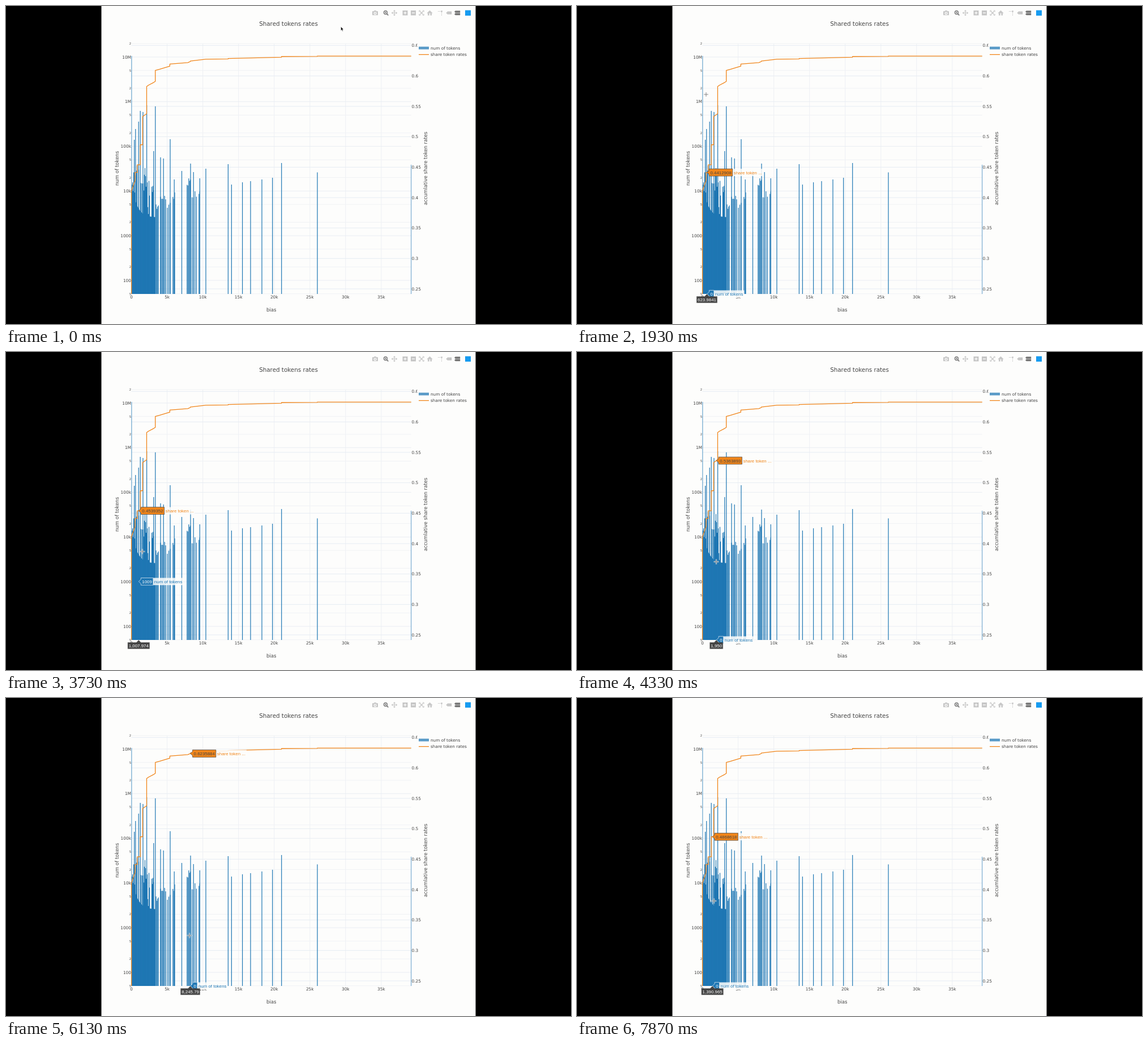
Recreate the animation shown at these times as an HTML page with a canvas. Size 998 px wide and 561 px high, loop 8000 ms.

```html
<!DOCTYPE html>
<html lang="en">
<head>
<meta charset="utf-8">
<title>Shared tokens rates</title>
<style>
  html, body { margin: 0; width: 100%; height: 100%; overflow: hidden; background: #000; }
  canvas { display: block; }
</style>
</head>
<body>
<canvas id="stage" width="998" height="561"></canvas>
<script>
const ctx = document.getElementById('stage').getContext('2d');
const PAPER = '#fdfdfc', BLUE = '#1f77b4', ORANGE = '#f0851a', INK = '#444';
const LEFT = 221.6, RIGHT = 715.7, TOP = 66, BOTTOM = 508;
const SANS = '"DejaVu Sans", sans-serif', LABEL_FONT = '"Liberation Sans", Arial, sans-serif';
const LOOP = 8000, TICKS = 120;

const xOf = k => LEFT + k * 12.606;                       // bias, thousands
const yLog = v => 90 + 78.8 * (7 - Math.log10(v));        // token count
const yRate = r => 123.3 + (0.6 - r) * 1073.5;            // accumulated rate
const noise = i => Math.abs(Math.sin(i * 12.9898) * 43758.5453) % 1;

// Jumps of the rate: [bias in thousands, rate before, rate after]
const curve = [
  [0, .2416, .4112], [.5, .428, .4412908], [.82, .4412908, .4539352],
  [1.24, .4539352, .4868618], [1.57, .4868618, .5332], [2.13, .5379, .5826],
  [2.41, .5849], [3.116921, .5892678], [3.34, .591, .6091], [3.9319, .6108736],
  [5.38, .6161, .6194], [7.9, .6218], [8.24579, .6235884, .6243], [10.4, .6275],
  [13.55, .6279, .6285], [21.02, .6307, .6317], [26.03, .632, .6325], [39.2, .6325]
].flatMap(([k, before, after = before]) => [[k, before], [k, after]]);

// Tall bars: [x, top]
const peaks = [
  [226.6, 236], [228.8, 217], [234.2, 204], [237.2, 185], [242, 187], [248.6, 175],
  [260.8, 256], [263.8, 177], [273, 267], [278.2, 269], [290, 235], [297.2, 306], [310.5, 291],
  [326, 278], [331.2, 293], [342.3, 304], [353, 287], [392.4, 279], [398.4, 315], [417.6, 311],
  [432, 309], [452, 306], [470.7, 303], [486.7, 277], [550, 293.5]
];

// Groups of short bars: [first x, count, spacing, typical top]
const clusters = [
  [265, 4, 1.4, 350], [273, 6, 1.8, 340], [285, 3, 2.5, 350],
  [294.8, 3, 1.6, 335], [319.8, 5, 1.5, 312], [328.6, 4, 2.6, 331], [340.8, 2, 1.5, 329]
];

// Pointer glides: [first tick, last tick, x, y, hovered bias in thousands]
const glides = [
  [0, 0, 592, 40, 29], [1, 6, 575, 44, 27.7], [12, 18, 228, 78, 3.116921],
  [18, 26, 228, 156, .6239841], [30, 36, 230, 473, .6239841], [41, 47, 226, 430, .33],
  [48, 56, 241, 352, 1.007974], [57, 65, 246, 370, 1.95], [66, 76, 273, 413, 3.9319],
  [82, 92, 324, 419, 8.24579], [93, 98, 244, 385, 1.78], [99, 105, 231, 365, .72],
  [113, 118, 242, 358, 1.390965]
];

function rateAt(k) {
  const i = Math.max(1, curve.findIndex(point => point[0] >= k));
  const [k0, r0] = curve[i - 1], [k1, r1] = curve[i];
  return r0 + (r1 - r0) * (k - k0) / (k1 - k0 || 1);
}

function pointerAt(tick) {
  let state = glides[0].slice(2);
  for (const [from, to, ...goal] of glides.slice(1)) {
    const p = Math.min(1, Math.max(0, (tick - from) / (to - from)));
    const eased = p * p * (3 - 2 * p);
    state = state.map((v, i) => v * (1 - eased) + goal[i] * eased);
  }
  return state;
}

function line(points, color, width) {
  ctx.beginPath();
  points.forEach(([x, y]) => ctx.lineTo(x, y));
  ctx.strokeStyle = color;
  ctx.lineWidth = width;
  ctx.stroke();
}

function plus(x, y, r, color, width) {
  line([[x - r, y], [x + r, y]], color, width);
  line([[x, y - r], [x, y + r]], color, width);
}

function box(x, y, w, h, color) {
  ctx.fillStyle = color;
  ctx.fillRect(x, y, w, h);
}

function polygon(points, fill, stroke = fill, width = 0.4) {
  ctx.beginPath();
  points.forEach(([x, y]) => ctx.lineTo(x, y));
  ctx.closePath();
  ctx.fillStyle = fill;
  ctx.fill();
  ctx.strokeStyle = stroke;
  ctx.lineWidth = width;
  ctx.stroke();
}

function ring(x, y, r, color) {
  ctx.beginPath();
  ctx.arc(x, y, r, 0, 7);
  ctx.strokeStyle = color;
  ctx.lineWidth = 1.3;
  ctx.stroke();
}

function text(str, x, y, size, align = 'left', color = INK, family = SANS) {
  ctx.font = `${size}px ${family}`;
  ctx.textAlign = align;
  ctx.fillStyle = color;
  ctx.fillText(str, x, y + size * 0.36);
}

function upright(str, x, y) {
  ctx.save();
  ctx.translate(x, y);
  ctx.rotate(-Math.PI / 2);
  text(str, 0, 0, 8.55, 'center');
  ctx.restore();
}

function drawAxes() {
  for (let k = 0; k <= 35; k += 5) {
    const x = xOf(k);
    if (k) line([[x, TOP], [x, BOTTOM]], '#eef0f4', 1);
    text(k ? k + 'k' : '0', x, 513.2, 7.4, 'center');
  }
  const names = { 2: '100', 3: '1000', 4: '10k', 5: '100k', 6: '1M', 7: '10M' };
  for (let e = 1; e <= 7; e++) {
    for (const m of [1, 2, 5]) {
      const y = yLog(m * 10 ** e);
      if (y < TOP - 1 || y > BOTTOM + 1) continue;
      line([[LEFT, y], [RIGHT, y]], m === 1 ? '#e9edf3' : '#f0f2f5', 1);
      text(m === 1 ? names[e] : m, 221, y, m === 1 ? 7.4 : 5.2, 'right');
    }
  }
  for (let i = 5; i <= 13; i++) {
    const y = yRate(i * 0.05);
    line([[LEFT, y], [RIGHT, y]], '#e6ecf3', 1);
    text(+(i * 0.05).toFixed(2), 716.5, y, 7.4);
  }
  text('Shared tokens rates', 499, 31.2, 10.35, 'center');
  text('bias', 468.7, 536, 8.55, 'center');
  upright('num of tokens', 195.6, 286.5);
  upright('accumlative share token rates', 740.5, 286.5);
}

function drawTraces() {
  const bar = (x, y) => box(x - 0.6, y, 1.2, BOTTOM - y, BLUE);
  for (let i = 0; i < 42; i++) {
    const x = 222 + i, floor = 373 - 58 * Math.exp(-i / 9);
    box(x, floor, 1.1, BOTTOM - floor, BLUE);
    if (noise(i) > 0.45) bar(x + 0.5, floor - 85 * noise(i + 50));
  }
  clusters.forEach(([x, count, gap, top]) => {
    for (let i = 0; i < count; i++) bar(x + i * gap, top + 16 * (noise(x + i) - 0.5));
  });
  peaks.forEach(([x, top]) => bar(x, top));
  line([[LEFT + 0.3, 88], [LEFT + 0.3, BOTTOM]], '#4b91c2', 1);
  line([[RIGHT, 280], [RIGHT, BOTTOM]], '#5f9cc8', 1);
  ctx.lineJoin = 'round';
  line(curve.map(([k, r]) => [xOf(k), yRate(r)]), ORANGE, 1.3);
  ctx.lineJoin = 'miter';
}

function drawLegend() {
  box(726.5, 66, 92, 26, PAPER);
  box(729, 72, 18, 4.2, '#8fbbd9');
  for (const [y, color] of [[72.6, BLUE], [75.5, BLUE], [85.6, ORANGE]]) {
    line([[729, y], [747, y]], color, 1.3);
  }
  text('num of tokens', 750, 74, 7.3);
  text('share token rates', 750, 85.6, 7.3);
}

function drawToolbar() {
  const pale = '#c6c6c6', dark = '#747474', y = 12.2;

  box(647, 9.2, 10, 7, pale);
  box(650, 8, 4, 2, pale);
  ring(652, 12.8, 1.9, PAPER);

  ring(670.4, 11.5, 3, dark);
  line([[672.5, 13.6], [675.3, 16.5]], dark, 1.7);
  plus(670.4, 11.5, 1.5, dark, 0.9);

  plus(686, y, 4.5, pale, 1.1);
  for (const [dx, dy] of [[1, 0], [0, 1], [-1, 0], [0, -1]]) {
    const cx = 686 + dx * 3, cy = y + dy * 3;
    polygon([[cx + dx * 2, cy + dy * 2], [cx + dy * 1.7, cy + dx * 1.7],
      [cx - dy * 1.7, cy - dx * 1.7]], pale);
  }

  for (const x of [705, 719.5]) box(x - 4.5, y - 4.3, 9, 8.6, pale);
  plus(705, y, 2.5, PAPER, 1.3);
  line([[717, y], [722, y]], PAPER, 1.3);

  for (const sx of [-1, 1]) for (const sy of [-1, 1]) {
    const at = (dx, dy) => [734 + sx * dx, y + sy * dy];
    line([at(1.8, 4.2), at(4.2, 4.2), at(4.2, 1.8)], pale, 1);
    line([at(0, 0), at(3, 3)], pale, 1.3);
  }

  polygon([[743.7, 12.6], [748.5, 8], [753.3, 12.6]], pale);
  box(745, 12.4, 2.6, 4.2, pale);
  box(749.4, 12.4, 2.6, 4.2, pale);

  ctx.setLineDash([1.5, 1]);
  line([[763, 9.5], [769.5, 9.5], [769.5, 17]], pale, 1);
  ctx.setLineDash([]);
  box(768.3, 8.2, 2.5, 2.5, pale);

  const tag = (x, top, w, h, color) => polygon([[x, top + h / 2], [x + h / 2, top], [x + w, top],
    [x + w, top + h], [x + h / 2, top + h]], color);
  tag(777.5, 9.8, 9.5, 4.8, pale);
  tag(792.2, 8.5, 9.8, 3.2, dark);
  tag(792.2, 12.8, 9.8, 3.2, dark);
  box(811, 7.5, 10, 9.5, '#169bf0');
}

function hoverLabel(x, y, value, name, fill, ink, edge) {
  ctx.font = `7.9px ${LABEL_FONT}`;
  const l = x + 4, r = l + ctx.measureText(value).width + 4, h = 6.4;
  ctx.globalAlpha = 0.85;
  box(r, y - h, ctx.measureText(name).width + 4, 2 * h, PAPER);
  ctx.globalAlpha = 1;
  polygon([[x, y], [l, y - 3.7], [l, y - h], [r, y - h], [r, y + h], [l, y + h], [l, y + 3.7]],
    fill, edge, 0.7);
  text(value, l + 2, y + 0.1, 7.9, 'left', ink, LABEL_FONT);
  text(name, r + 2, y + 0.1, 7.9, 'left', fill, LABEL_FONT);
}

function drawHover(bias) {
  const x = xOf(bias), rate = rateAt(bias);
  const count = Math.abs(bias - 1.008) < 0.004 ? 1009 : 0;
  hoverLabel(x, count ? yLog(count) : BOTTOM, String(count), 'num of tokens', BLUE, '#fff', '#e8f0f6');
  hoverLabel(x, yRate(rate), rate.toFixed(7), 'share token ...', ORANGE, INK, INK);

  const value = (bias * 1000).toLocaleString('en-US', { maximumSignificantDigits: 7 });
  ctx.font = `7.9px ${LABEL_FONT}`;
  const half = ctx.measureText(value).width / 2 + 1.6, top = 512.4, base = 523.6;
  polygon([[x, BOTTOM + 0.4], [x + 4, top], [x + half, top], [x + half, base],
    [x - half, base], [x - half, top], [x - 4, top]], INK);
  text(value, x, 518, 7.9, 'center', '#fff', LABEL_FONT);
}

function drawPointer(x, y, inside) {
  if (inside) {
    plus(x, y, 4.4, '#ffffffb0', 2.4);
    plus(x, y, 3.8, '#777', 0.9);
  } else {
    const arrow = [[0, 0], [0, 7], [1.6, 5.6], [2.7, 8], [3.8, 7.5], [2.8, 5.2], [4.8, 5]];
    polygon(arrow.map(([dx, dy]) => [x - 0.5 + dx, y - 3.6 + dy]), '#111', '#fff', 0.5);
  }
}

function render(now) {
  const tick = Math.floor((now % LOOP + 4) / LOOP * TICKS);
  const [x, y, bias] = pointerAt(tick);
  const inside = x >= LEFT && x <= RIGHT && y >= TOP && y <= BOTTOM;
  box(0, 0, 998, 561, '#000');
  box(168.5, 0, 661, 561, PAPER);
  drawAxes();
  drawTraces();
  drawLegend();
  drawToolbar();
  if (inside) drawHover(bias);
  drawPointer(x, y, inside);
}

const start = performance.now();
function loop() {
  render(performance.now() - start);
  requestAnimationFrame(loop);
}
loop();
</script>
</body>
</html>
```
